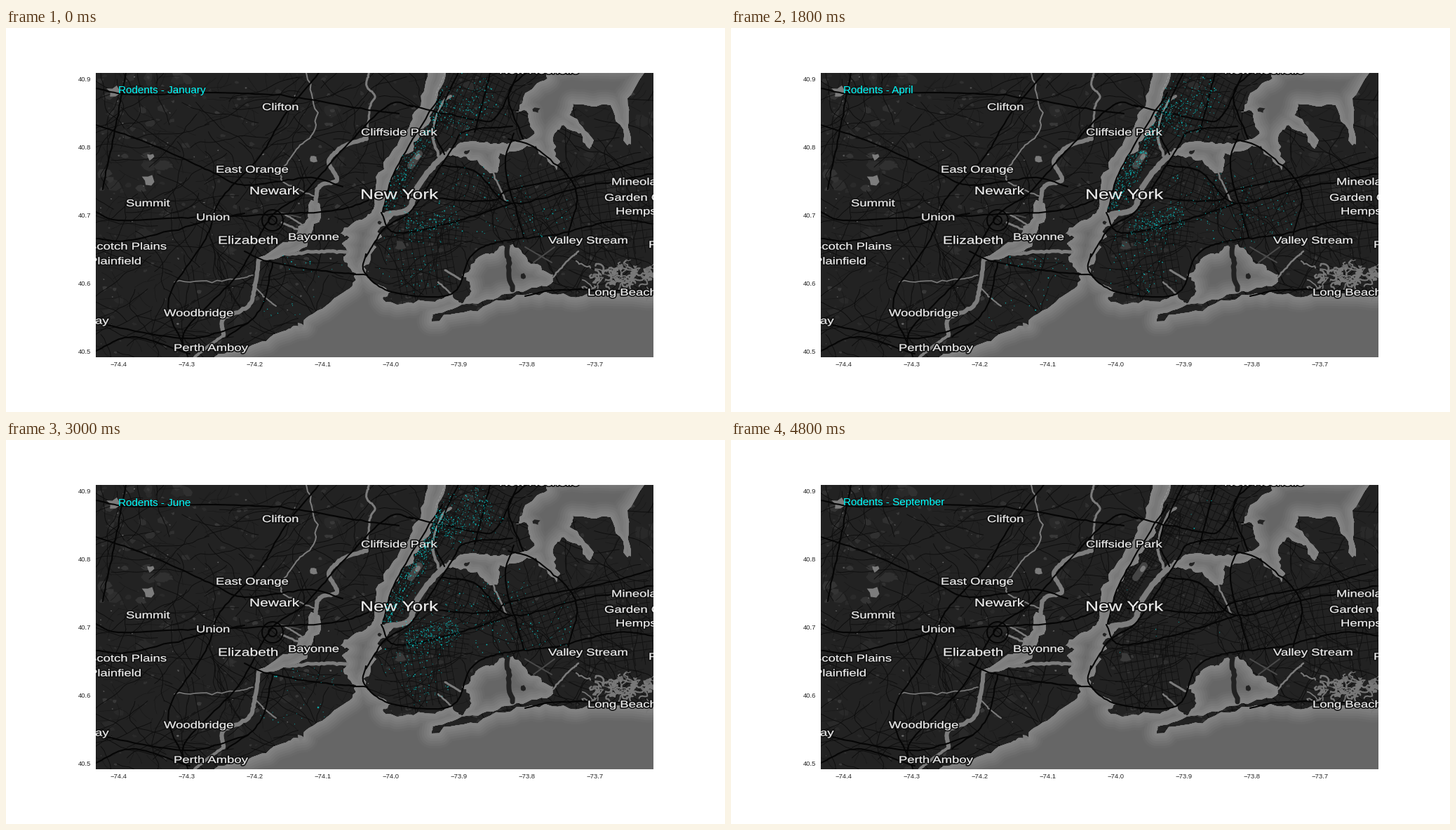
Write a matplotlib script that moves like this. It is 1025 px wide and 547 px high and loops after 5400 ms.

```python
import math

import numpy as np
import matplotlib.pyplot as plt
from matplotlib.animation import FuncAnimation
from matplotlib.collections import LineCollection, PolyCollection
from matplotlib.patches import PathPatch, Polygon
from matplotlib.path import Path
from matplotlib.textpath import TextPath
from matplotlib.transforms import Affine2D

W, H, DPI = 1025, 547, 100
LEFT, RIGHT, TOP, BOTTOM = 128, 923, 64, 469
STAGE = (LEFT, RIGHT, TOP, BOTTOM)
PX = 72 / DPI
SQUASH = math.cos(math.radians(40.7))  # Mercator map on an even degree grid
FONT = "Liberation Sans"
LAND, SEA, RIVER, ROAD = "#222222", "#666666", "#7c7c7c", "#050505"
MONTHS = ["January", "February", "March", "April", "May",
          "June", "July", "August", "September"]
COUNTS = [620, 640, 800, 900, 1020, 1080, 1180, 1050, 10]

rng = np.random.default_rng(11)
fig = plt.figure(figsize=(W / DPI, H / DPI), dpi=DPI, facecolor="white")
ax = fig.add_axes([LEFT / W, 1 - BOTTOM / H, (RIGHT - LEFT) / W, (BOTTOM - TOP) / H])
ax.set(xlim=(LEFT, RIGHT), ylim=(BOTTOM, TOP), xticks=[], yticks=[], facecolor=LAND)
for spine in ax.spines.values():
    spine.set_visible(False)


def curve(pts, n=6):
    """Catmull-Rom curve through the points."""
    p = np.array(pts, float)
    q = np.vstack([2 * p[0] - p[1], p, 2 * p[-1] - p[-2]])
    t = np.linspace(0, 1, n, endpoint=False)[:, None]
    parts = [b + (c - a) * t / 2 + (a - 2.5 * b + 2 * c - d / 2) * t**2
             + (1.5 * (b - c) + (d - a) / 2) * t**3
             for a, b, c, d in zip(q, q[1:], q[2:], q[3:])]
    return np.vstack(parts + [p[-1:]])


def rough(pts, amp, levels=1):
    """Fractal coast: push each midpoint sideways."""
    p = np.array(pts, float)
    for _ in range(levels):
        d = np.diff(p, axis=0)
        size = np.hypot(*d.T) + 1e-6
        normal = np.stack([-d[:, 1], d[:, 0]], 1) / size[:, None]
        shift = rng.normal(0, amp, len(d)) * np.minimum(size, 20)
        out = np.empty((2 * len(p) - 1, 2))
        out[::2] = p
        out[1::2] = (p[:-1] + p[1:]) / 2 + normal * shift[:, None]
        p = out
    return p


def lines(paths, color, width, z):
    ax.add_collection(LineCollection(paths, colors=color, linewidths=np.multiply(width, PX),
                                     zorder=z, capstyle="round", joinstyle="round"),
                      autolim=False)


def area(pts, color, z):
    patch = Polygon(pts, facecolor=color, lw=0, zorder=z)
    ax.add_patch(patch)
    return patch


def water(pts):
    pts = rough(pts + pts[:1], .13, 3)
    body = area(pts, SEA, 4)
    for k in range(6):  # paler towards the shore
        edge = Polygon(pts, fill=False, ec=str(.41 + .02 * k), lw=(43 - 7 * k) * PX,
                       joinstyle="round", zorder=4)
        ax.add_patch(edge)
        edge.set_clip_path(body)
    return Path(pts)


def wander(box, steps, step, turn):
    x0, x1, y0, y1 = box
    head = rng.uniform(0, 2 * math.pi) + np.cumsum(rng.normal(0, turn, steps))
    start = np.array([rng.uniform(x0, x1), rng.uniform(y0, y1)])
    return start + np.cumsum(np.stack([np.cos(head), .8 * np.sin(head)], 1) * step, 0)


def blob(x, y, r, n=8):
    a = np.linspace(0, 2 * math.pi, n, endpoint=False) + rng.uniform(0, 1)
    rad = r * rng.uniform(.5, 1.3, n)
    return np.stack([x + rad * np.cos(a), y + .8 * rad * np.sin(a)], 1)


def patches(count, low, high, colors, box=STAGE, z=1):
    polys = [blob(rng.uniform(*box[:2]), rng.uniform(*box[2:]), rng.uniform(low, high))
             for _ in range(count)]
    ax.add_collection(PolyCollection(polys, facecolors=rng.choice(colors, count),
                                     linewidths=0, zorder=z), autolim=False)


def streets(cx, cy, rx, ry, angle, step):
    turn = Affine2D().rotate_deg(angle).translate(cx, cy)
    rows = [[(-rx, v), (rx, v)] for v in np.arange(-ry, ry, step)]
    cols = [[(u, -ry), (u, ry)] for u in np.arange(-rx, rx, step * 1.3)]
    lines([turn.transform(s) for s in rows + cols], "#101010", .8, 2)


# Parks, ponds and side streets
patches(45, 6, 13, ["#292929", "#2d2d2d"])
patches(480, 1, 4.5, ["#2a2a2a", "#303030", "#383838"])
patches(22, 5, 11, ["#303030", "#343434"], (LEFT, 290, TOP, 230))
patches(60, .6, 1.8, ["#555555", "#6a6a6a"], (LEFT, 520, TOP, 460))
lines([wander(STAGE, 5, 8, .2) for _ in range(750)], "#191919", .7, 2)
lines([curve(wander(STAGE, 14, 9, .2), 2) for _ in range(260)], "#0d0d0d", .9, 2)
for block in [(582, 180, 95, 17, -58, 4), (592, 335, 45, 45, 80, 9), (610, 285, 50, 22, 8, 7),
              (655, 228, 55, 26, 20, 9), (765, 250, 50, 45, -20, 9),
              (670, 115, 50, 50, -65, 9), (870, 265, 52, 60, -8, 11)]:
    streets(*block)

# Harbour, ocean and bays
hudson = [(612, 50), (592, 104), (572, 146), (548, 180), (531, 206)]
west_shore = [(524, 258), (508, 273), (477, 293), (490, 298), (479, 307), (485, 314), (481, 328),
              (499, 359), (468, 385), (424, 424), (395, 432), (345, 455), (280, 475)]
ocean = [(280, 640), (1000, 640), (1000, 382), (830, 378), (760, 381), (680, 397), (607, 418),
         (608, 408), (665, 392), (722, 378)]
jamaica_bay = [(777, 364), (780, 352), (748, 336), (722, 308), (712, 306), (700, 317), (678, 324),
               (650, 352), (664, 375), (650, 393), (636, 379), (612, 390), (550, 391),
               (537, 384), (548, 376)]
brooklyn = [(520, 360), (509, 340), (528, 312), (524, 306), (536, 297), (529, 291), (545, 276),
            (552, 267), (536, 262)]
east_bank = [(x + 21, y) for x, y in reversed(hudson)]
sound = [(620, 190), (640, 182), (672, 188), (690, 207), (700, 206), (704, 178), (756, 168),
         (785, 202), (790, 190), (780, 155), (795, 138), (820, 150), (832, 172), (838, 160),
         (803, 124), (808, 108), (862, 110), (886, 167), (891, 165), (886, 100), (920, 50),
         (768, 50), (772, 72), (738, 98), (727, 120), (745, 122), (754, 150), (708, 163),
         (664, 161), (632, 171)]
newark_bay = [(435, 245), (447, 250), (434, 300), (418, 317), (358, 334), (357, 328), (402, 305),
              (426, 278)]
seas = [water(hudson + west_shore + ocean + jamaica_bay + brooklyn + east_bank),
        water(sound), water(newark_bay)]

rivers = [
    (8, [(543, 265), (574, 258), (585, 230), (606, 200), (626, 180)]),
    (5, [(400, 322), (450, 318), (486, 319)]),
    (6, [(360, 331), (356, 362), (346, 396), (310, 414), (310, 438)]),
    (4, [(310, 438), (290, 452), (265, 472)]),
    (2, [(352, 366), (372, 386), (385, 396)]),
    (1.6, [(352, 352), (325, 358), (240, 362)]),
    (6, [(441, 250), (447, 225), (472, 216), (460, 190), (482, 168), (514, 158)]),
    (3, [(514, 158), (519, 112), (526, 97), (514, 82), (518, 60)]),
    (2, [(441, 240), (392, 215), (412, 176), (442, 138), (427, 60)]),
    (4, [(618, 184), (608, 150), (622, 108), (634, 97)]),
    (2.5, [(693, 203), (713, 247)]),
    (2.5, [(398, 266), (424, 281)]),
    (3, [(393, 277), (418, 288)]),
    (3, [(626, 345), (648, 358)]),
    (2.5, [(616, 362), (634, 378)]),
    (2.5, [(780, 355), (800, 332), (816, 318)]),
]
for width, pts in rivers:
    lines([rough(curve(pts), .1)], RIVER, width, 4)

marsh = (834, RIGHT, 338, 368)
lines([wander(marsh, 9, 3.5, .8) for _ in range(42)], "#777777", rng.uniform(1, 2.6, 42), 4)
patches(26, 1.5, 5, ["#787878", "#6e6e6e"], marsh, 4)
for x, y, r in [(205, 183, 6), (204, 216, 9), (153, 90, 9), (420, 424, 6), (439, 186, 7)]:
    area(blob(x, y, r), RIVER, 4)
for x, y, r in [(657, 177, 5), (533, 277, 3), (756, 117, 5), (738, 354, 6)]:
    area(blob(x, y, r), LAND, 5)
lines([rough([(712, 308), (718, 335), (722, 373)], .1, 3)], LAND, 7, 5)
lines([[(577, 196), (589, 179)]], "#454545", 10, 3)
lines([[(586, 185), (588, 182)]], "#7a7a7a", 6, 3)
area(blob(562, 311, 10), "#3a3a3a", 3)
lines([[(740, 312), (778, 334)], [(752, 334), (782, 312)], [(388, 262), (420, 270)]],
      "#4a4a4a", 2, 5)
ax.plot([626, 612], [64, 96], color="#a0a0a0", lw=.8 * PX, ls=(0, (4, 3)), zorder=5)

# Highways
mainland = [
    [(260, 472), (256, 430), (330, 352), (377, 270), (425, 235), (478, 175), (545, 110), (580, 112)],
    [(252, 452), (232, 385), (285, 300), (305, 245), (360, 185), (400, 120), (450, 60)],
    [(128, 262), (160, 274), (250, 270), (372, 266), (480, 258), (545, 232)],
    [(128, 138), (200, 163), (290, 203), (340, 224), (430, 213), (480, 226)],
    [(128, 86), (180, 95), (290, 92), (400, 97), (500, 114), (560, 122)],
    [(128, 420), (258, 442), (345, 420)],
    [(138, 230), (158, 130), (172, 60)],
    [(128, 300), (180, 302), (290, 274), (340, 264)],
    [(128, 460), (180, 440), (262, 464)],
]
islands = [
    [(340, 318), (372, 332), (450, 346), (515, 352)],
    [(315, 440), (362, 402), (380, 335)],
    [(513, 322), (511, 348), (550, 376), (635, 379), (662, 326), (700, 305), (780, 295)],
    [(513, 326), (540, 285), (575, 263), (602, 225), (637, 170), (655, 147), (722, 140)],
    [(565, 240), (690, 246), (720, 230), (850, 205), (923, 184)],
    [(622, 196), (670, 205), (720, 250), (815, 228), (923, 208)],
    [(724, 150), (712, 200), (738, 298)],
    [(716, 158), (756, 172), (812, 228), (800, 300)],
    [(575, 110), (670, 131), (700, 125), (732, 60)],
    [(625, 180), (612, 140), (646, 60)],
    [(668, 148), (692, 60)],
    [(737, 158), (716, 95), (745, 60)],
    [(780, 295), (870, 274), (923, 279)],
    [(535, 263), (556, 292), (640, 276), (720, 250)],
    [(537, 262), (556, 200), (622, 92)],
    [(740, 382), (790, 373), (923, 375)],
]
for pts in mainland + islands:
    lines([rough(curve(pts), .04)], ROAD, 2.1, 6)
loop = np.linspace(0, 2 * math.pi, 40)
for r in (15, 6):
    lines([np.stack([380 + r * np.cos(loop), 274 + r * np.sin(loop)], 1)], ROAD, 2, 6)

# Place names: x, baseline
places = {
    "New York": (505, 243.5), "Newark": (347, 237), "Elizabeth": (302, 307.5),
    "Clifton": (365, 117), "Cliffside Park": (506, 153), "East Orange": (299, 206),
    "Summit": (171, 254), "Union": (271, 274), "Bayonne": (402, 302),
    "Woodbridge": (225, 410.5), "Perth Amboy": (239, 460), "Valley Stream": (773, 307),
    "Long Beach": (829, 381), "Mineola": (863, 223.5), "Garden City": (853, 246),
    "Hempstead": (869, 265.5), "Freeport": (916, 313), "Scotch Plains": (117, 315.5),
    "Plainfield": (118, 336.5), "Piscataway": (53, 421.5), "New Rochelle": (703, 65),
}
sizes = {"New York": 26.3, "Newark": 21, "Elizabeth": 21}
for name, (x, y) in places.items():
    glyphs = TextPath((0, 0), name, size=sizes.get(name, 18.5), prop={"family": FONT})
    place = Affine2D().scale(1, -SQUASH).translate(x, y) + ax.transData
    for color, width in [("#111111", 3.6), ("#ececec", .25)]:
        ax.add_patch(PathPatch(glyphs, fc=color, ec=color, lw=width * PX, joinstyle="round",
                               transform=place, zorder=8))

# Degree labels
tick = dict(family=FONT, fontsize=9.5 * PX, color="#262626", va="center")
for k in range(8):
    fig.text((160.5 + 97 * k) / W, 1 - 479.5 / H, f"\u2212{74.4 - k / 10:.1f}", ha="center", **tick)
for k in range(5):
    fig.text(121 / W, 1 - (73 + 97.2 * k) / H, f"{40.9 - k / 10:.1f}", ha="right", **tick)

# Sightings spread along district axes: x0, y0, x1, y1, spread, share
districts = np.array([
    (543, 252, 620, 108, 7, .35), (625, 132, 690, 90, 17, .21), (572, 284, 642, 268, 11, .2),
    (570, 290, 600, 370, 22, .08), (630, 225, 740, 215, 20, .05),
    (670, 280, 800, 262, 17, .075), (385, 335, 475, 340, 9, .022), (370, 405, 455, 385, 10, .013),
])
hot_spots = {0: [(657, 152)], 2: [(563, 303)], 4: [(541, 253), (666, 238)],
             5: [(593, 287), (580, 293), (445, 381)], 6: [(755, 122), (368, 401)]}


def sightings(month):
    r = np.random.default_rng(70 + month)
    n = COUNTS[month]
    share = districts[:, 5] / districts[:, 5].sum()
    d = districts[r.choice(len(districts), int(n * 1.4), p=share)]
    axis = d[:, 2:4] - d[:, :2]
    normal = np.stack([-axis[:, 1], axis[:, 0]], 1) / np.hypot(*axis.T)[:, None]
    pts = d[:, :2] + axis * r.uniform(-.05, 1.05, (len(d), 1))
    pts += normal * (r.normal(0, 1, len(d)) * d[:, 4])[:, None]
    wet = np.any([sea.contains_points(pts) for sea in seas], axis=0)
    pts = pts[~wet][:n]
    size = r.choice([1.1, 1.4, 1.9], len(pts), p=[.62, .31, .07])
    extra = hot_spots.get(month, [])
    pts = np.vstack([pts, np.reshape(extra, (-1, 2))])
    return pts, (np.append(size, [2.6] * len(extra)) * PX) ** 2


data = [sightings(m) for m in range(len(MONTHS))]
dots = ax.scatter([], [], c="#00ffff", alpha=.62, linewidths=0, zorder=9)
title = ax.text(160.5, 93.5, "", family=FONT, fontsize=15.3 * PX, color="#00ffff", zorder=10)
ax.set(xlim=(LEFT, RIGHT), ylim=(BOTTOM, TOP))


def update(month):
    pts, size = data[month]
    dots.set_offsets(pts)
    dots.set_sizes(size)
    title.set_text(f"Rodents - {MONTHS[month]}")
    return dots, title


anim = FuncAnimation(fig, update, frames=len(MONTHS), interval=600, repeat=True, repeat_delay=0)
plt.show()
```
